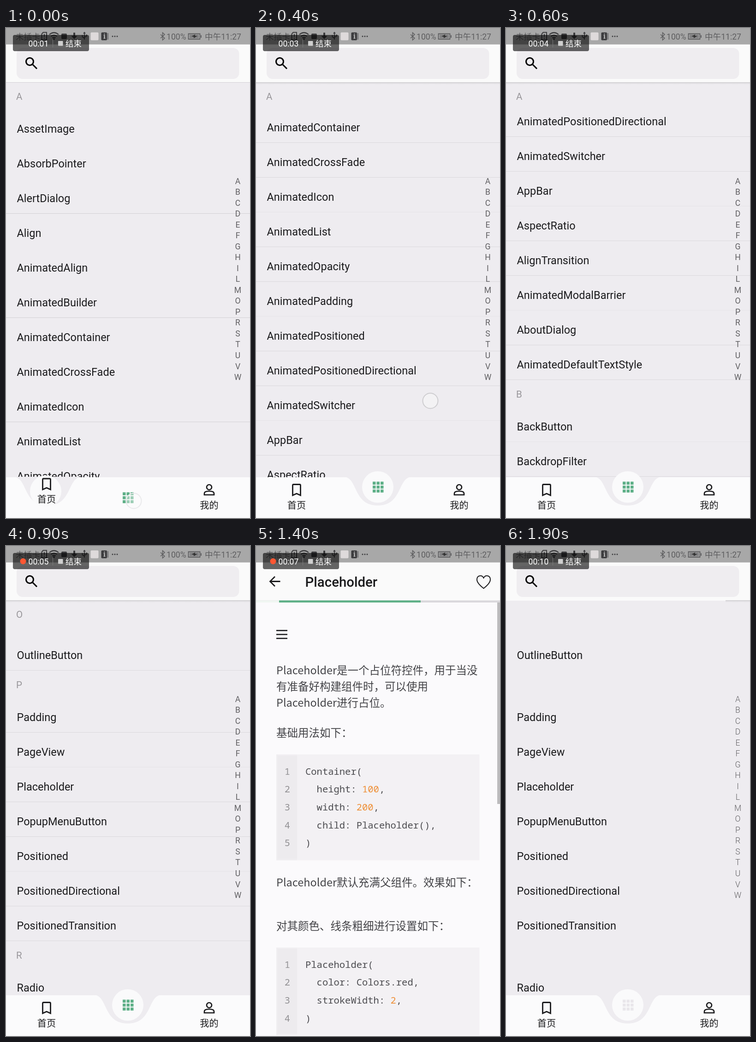
Recreate the animation shown at these times as an HTML page with a canvas. Size 529 px wide and 1058 px high, loop 2 s.

```html
<!DOCTYPE html>
<html lang="zh-CN">
<head>
<meta charset="utf-8">
<title>Widget catalogue</title>
<style>
html, body { margin: 0; width: 529px; height: 1058px; overflow: hidden; background: #fafafa; }
canvas { display: block; }
</style>
</head>
<body>
<canvas id="stage" width="529" height="1058"></canvas>
<script>
const ctx = document.getElementById('stage').getContext('2d');
const W = 529, H = 1058, LOOP = 2000, STEP = 100;
const UI = 'Roboto, "Noto Sans CJK SC", "Noto Sans CJK", sans-serif';
const CJK = '"Noto Sans CJK SC", "Noto Sans CJK", sans-serif';
const MONO = '"Noto Sans Mono", monospace';
const GREEN = '#5fb088', LIST_BG = '#eeecf0', BAR_BG = '#fbfbfc', INK = '#1b1b1d';

// One-letter entries are section headings.
const TOP_ROWS = ('A AssetImage AbsorbPointer AlertDialog Align AnimatedAlign AnimatedBuilder ' +
  'AnimatedContainer AnimatedCrossFade AnimatedIcon AnimatedList AnimatedOpacity AnimatedPadding ' +
  'AnimatedPositioned AnimatedPositionedDirectional AnimatedSwitcher AppBar AspectRatio ' +
  'AlignTransition AnimatedModalBarrier AboutDialog AnimatedDefaultTextStyle ' +
  'B BackButton BackdropFilter Baseline BottomNavigationBar BottomSheet ButtonBar').split(' ');
const LOWER_ROWS = ('OutlineButton P Padding PageView Placeholder PopupMenuButton Positioned ' +
  'PositionedDirectional PositionedTransition R Radio').split(' ');
const SCROLL = [0, 0, 110, 270, 452.5, 735, 991, 1150];

function rect(x, y, w, h, color, radius = 0) {
  ctx.fillStyle = color;
  ctx.beginPath();
  ctx.roundRect(x, y, w, h, radius);
  ctx.fill();
}

function disc(x, y, r, color) {
  ctx.fillStyle = color;
  ctx.beginPath();
  ctx.arc(x, y, r, 0, Math.PI * 2);
  ctx.fill();
}

function text(str, x, y, size, color, family = UI, weight = 400, align = 'left') {
  ctx.font = `${weight} ${size}px ${family}`;
  ctx.fillStyle = color;
  ctx.textAlign = align;
  ctx.fillText(str, x, y);
}

function stroke(path, color, width, x = 0, y = 0) {
  ctx.save();
  ctx.translate(x, y);
  ctx.strokeStyle = color;
  ctx.lineWidth = width;
  ctx.stroke(new Path2D(path));
  ctx.restore();
}

function fillPath(path, color) {
  ctx.fillStyle = color;
  ctx.fill(new Path2D(path));
}

function touch(x, y, ring) {
  disc(x, y, 16.5, 'rgba(250,250,250,.4)');
  ctx.strokeStyle = ring;
  ctx.lineWidth = 2;
  ctx.stroke();
}

function statusBar(t) {
  const dark = '#3c3c3e', gray = '#5d5d5f';
  rect(0, 0, W, 35.5, 'rgba(0,0,0,.33)');
  text('未插卡', 21, 24.5, 17.6, gray);
  stroke('M77.5 13l3-3.5h7.5v16h-10.5zM83 13v6M83 21v2', dark, 2);
  stroke('M94 14q10-8 20 0M97.5 18q6.5-5 13 0M100.5 21.5q3.5-2.5 7 0', dark, 2.2);
  disc(104, 24, 2, dark);
  rect(120, 12, 12, 12, dark, 2);
  fillPath('M146 10h4v7h4.500l-6.500 7l-6.500-7h4.500z', dark);
  stroke('M170 10v15M165.500 15v4l4.500 3M174.500 14v4l-4.500 2', dark, 1.8);
  fillPath('M170 8l3 4h-6z', dark);
  rect(183.5, 9.5, 17, 17, '#dedadb', 2);
  rect(206.5, 9.5, 12.5, 17, dark, 2);
  stroke('M221 11v14', gray, 1.5);
  text('i', 211, 23, 14, '#c4c4c4', '"Noto Serif", serif', 700);
  for (const x of [231, 236, 241]) disc(x, 18, 1.5, dark);
  stroke('M335 14l9 8l-4.500 4v-16l4.500 4l-9 8', gray, 1.5);
  text('100%', 348, 24.5, 17.6, gray);
  stroke('M395.500 12.500h25v11.500h-25zM423 15.500v5.500', gray, 1.8);
  rect(398, 14.5, 20, 7.5, '#818183');
  fillPath('M402 18l8-4v3h5l-8 5v-3z', '#333');
  text('中午11:27', 431, 24.5, 17.6, gray);

  const seconds = 1.4 + t * 0.0046;
  rect(15, 15, 165, 35, 'rgba(0,0,0,.6)', 4);
  if (seconds % 1 > 0.43) disc(37, 33, 6.5, '#ff5733');
  text('00:' + String(Math.floor(seconds)).padStart(2, '0'), 48.5, 39.5, 17.6, '#fff');
  rect(101, 25, 1, 17, '#7b7b7b');
  rect(113, 28, 10.5, 10.5, '#cfcfcf', 1);
  text('结束', 129, 39.5, 17.4, '#fff');
}

function headerShadow(x) {
  const g = ctx.createLinearGradient(0, 117, 0, 123);
  g.addColorStop(0, '#c9c8cb');
  g.addColorStop(1, 'rgba(238,236,240,0)');
  ctx.fillStyle = g;
  ctx.fillRect(x, 117, W - x, 6);
}

function rows(list, top, t, returning) {
  let index = top > 118 ? 1 : 0;
  for (const name of list) {
    const heading = name.length === 1;
    if (heading && !returning) text(name, 22, top + 36.5, 20.6, '#98969a');
    if (!heading) {
      text(name, 23.5, top + 48.5, 23.5, INK);
      const third = index++ % 3;
      let line = third === (t < 500 ? 2 : 0) ? '#e6e4e8' : '#dbd9dd';
      if (t < 100) line = third === 2 ? '#d3d1d5' : null;
      if (line && !returning) rect(0, Math.round(top + 72.5), W, 1, line);
    }
    top += heading ? 59 : 75;
  }
}

function grid(x, y, color) {
  for (let i = 0; i < 9; i++)
    rect(x - 11.5 + (i % 3) * 8.5, y - 11.5 + Math.floor(i / 3) * 8.5, 6.5, 6.5, color);
}

function navigation(t, returning) {
  const p = Math.min(1, t / 200);
  const ease = p * p * (3 - 2 * p);
  const cx = 90 + 174 * ease, raise = 12.5 * (1 - ease);
  rect(0, 970, W, 88, BAR_BG);
  fillPath(`M${cx - 75} 969C${cx - 42} 969 ${cx - 55} 1031 ${cx} 1031` +
    `S${cx + 42} 969 ${cx + 75} 969z`, LIST_BG);
  disc(cx - 4 * (1 - ease), 1000 - 9 * ease, 34, '#fafafb');
  stroke('M-8.500 11.500v-21.500q0-2 2-2h13q2 0 2 2v21.500l-8.500-3.800z', INK, 2.8, 88, 997.5 - raise);
  text('首页', 88, 1037.5 - raise, 20.2, INK, CJK, 400, 'center');
  grid(264.5, 1014 - 23 * ease, returning ? '#e9e7eb' : GREEN);
  stroke('M-5.500-6a5.200 5.200 0 1 0 11 0a5.200 5.200 0 1 0-11 0z' +
    'M-10.500 10.500v-3q0-5 10.500-5t10.500 5v3z', INK, 2.7, 440.5, 997.5);
  text('我的', 440.5, 1037.5, 20.2, INK, CJK, 400, 'center');
  if (t < 100) touch(277, 1021, '#e9e9eb');
}

function catalogue(t) {
  const returning = t >= 1900, lower = t >= 800;
  rect(0, 0, W, H, LIST_BG);
  if (lower) rows(LOWER_ROWS, 195, t, returning);
  else rows(TOP_ROWS, 118 - SCROLL[t / STEP], t, false);
  rect(0, 118, W, 59, LIST_BG);
  if (!returning) text(lower ? 'O' : 'A', 22, 154.5, 20.6, '#98969a');

  [...'ABCDEFGHILMOPRSTUVW'].forEach((letter, i) =>
    text(letter, 502.5, 336.5 + i * 23.53, 17.6, '#616063', UI, returning ? 300 : 400, 'center'));

  rect(0, 0, W, 118, '#fafafa');
  if (t < 100) rect(0, 117, W, 1, '#d3d1d5');
  else headerShadow(returning ? 476 : 0);
  rect(23, 43, 482.5, 67, '#efedf0', 13);
  stroke('M43.500 72.500a8 8 0 1 0 16 0a8 8 0 1 0-16 0zM57.500 78.500l9.500 9.500', '#000', 3.1);
  navigation(t, returning);
  if (t === 400) touch(378, 805, '#cecdd0');
}

function codeBlock(y, h, lines) {
  rect(44, y, 440.5, h, '#f3f1f4');
  rect(44, y, 45, h, '#f0eef1');
  rect(47, y + 3, 42, h - 6, '#edebee');
  lines.forEach((line, i) => {
    const base = y + 43.5 + i * 38.7;
    text(String(i + 1), 68, base, 20.5, '#929194', MONO, 400, 'center');
    let x = 107;
    for (const part of line.split(/(\d+)/)) {
      text(part, x, base, 20.5, /^\d/.test(part) ? '#ee8f37' : '#4b4b4f', MONO);
      x += ctx.measureText(part).width;
    }
  });
}

function article() {
  const copy = [
    ['Placeholder是一个占位符控件，用于当没', 276.5],
    ['有准备好构建组件时，可以使用', 311.5],
    ['Placeholder进行占位。', 346.5],
    ['基础用法如下：', 411.5],
    ['Placeholder默认充满父组件。效果如下：', 734.5],
    ['对其颜色、线条粗细进行设置如下：', 828.5]
  ];
  for (const y of [182.5, 191, 199.5]) rect(44, y - 1.3, 24, 2.6, INK);
  for (const [line, y] of copy) text(line, 44, y, 23.5, '#434347', CJK);
  codeBlock(450, 228.5, ['Container(', '  height: 100,', '  width: 200,', '  child: Placeholder(),', ')']);
  codeBlock(867, 189, ['Placeholder(', '  color: Colors.red,', '  strokeWidth: 2,', ')']);
}

function detail(t) {
  const loaded = t >= 1300;
  rect(0, 0, W, H, loaded ? '#fbfafc' : '#f5f3f7');
  rect(0, 0, W, 118, '#fafafa');
  stroke('M52.500 76.500h-21M41 66l-10.500 10.500l10.500 10.500', INK, 2.8);
  text('Placeholder', 106.5, 87.5, 29.4, INK, UI, 500);
  stroke('M0 14C-9 7-14.500 1-14.500-5C-14.500-14-4-16 0-8.500C4-16 14.500-14 14.500-5C14.500 1 9 7 0 14z',
    t >= 1700 ? '#d9573a' : INK, 2, 493.5, 77.5);
  rect(0, 117.5, W, 4.5, '#dad8dc');
  rect(0, 117.5, 51, 4.5, loaded ? '#f0f6f2' : '#ecebee');
  if (loaded) {
    article();
    rect(50, 117.5, 307 + (t - 1400) * 0.2975, 4.5, GREEN);
    if (t < 1700) rect(523, 122, 6, 435, '#bcbbbd');
  }
}

function frame() {
  const t = Math.floor(performance.now() % LOOP / STEP) * STEP;
  if (t >= 1100 && t < 1900) detail(t);
  else catalogue(t);
  statusBar(t);
  requestAnimationFrame(frame);
}
frame();
</script>
</body>
</html>
```
